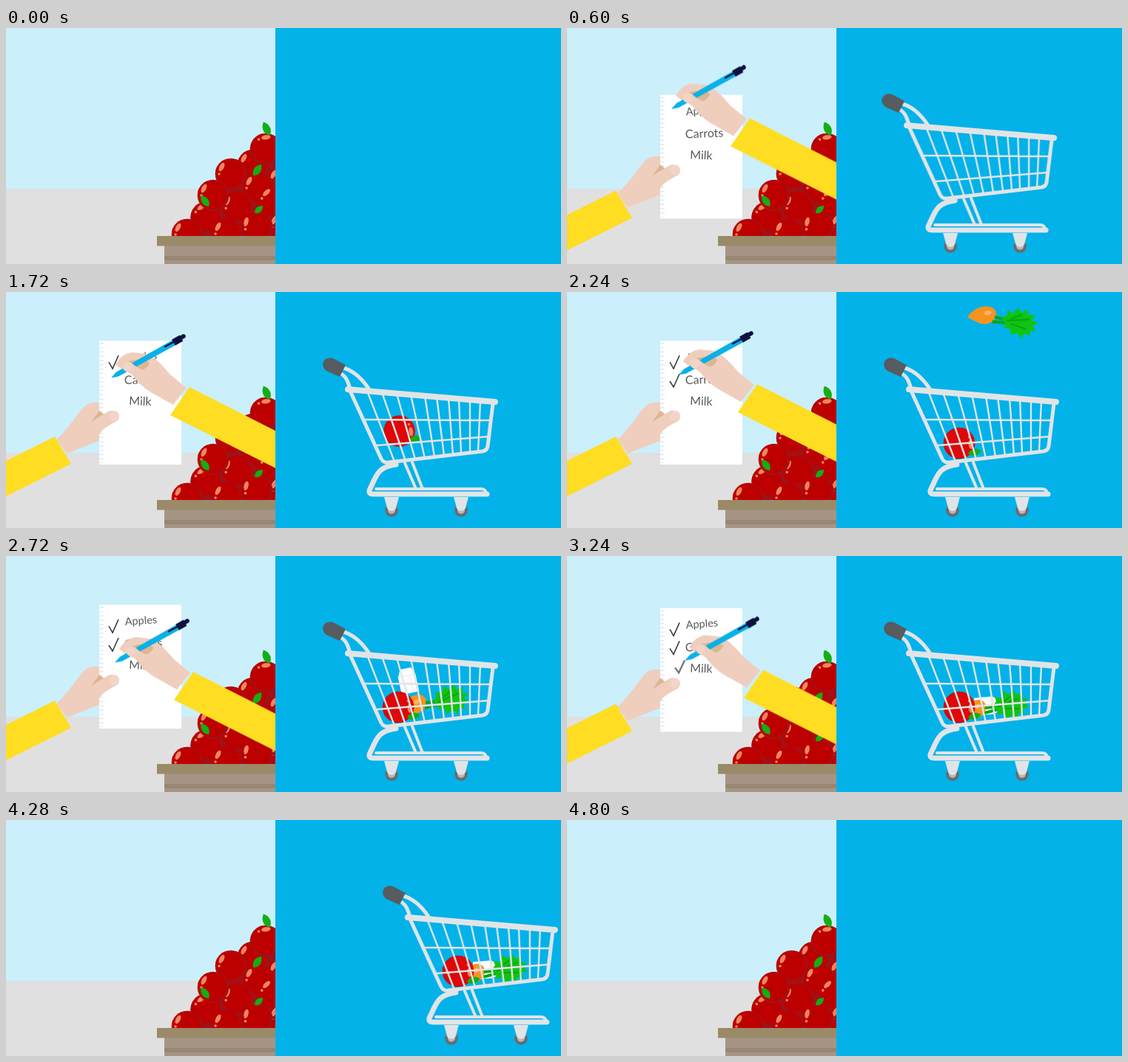
These frames come from a looping animation (750x320 px, 5.76 s). An HTML page:

```html
<!DOCTYPE html>
<html lang="en">
<head>
<meta charset="utf-8">
<title>Shopping list</title>
<style>
  html, body { margin: 0; width: 100%; height: 100%; overflow: hidden; }
  svg { display: block; }
  text { font-family: Lato, "Open Sans", sans-serif; font-size: 16px; fill: #595959; }

  .desk, .writer, .tick, .cart, .apple, .carrot, .milk {
    animation: 5760ms linear infinite;
  }
  .desk { animation-name: desk; }
  .writer { animation-name: writer; }
  .cart { animation-name: cart; }
  .apple { animation-name: apple; }
  .carrot { animation-name: carrot; }
  .milk { animation-name: milk; }
  .apple, .carrot { transform-box: fill-box; transform-origin: center; }

  .tick {
    animation-name: tick;
    fill: none; stroke: #333; stroke-width: 1.5;
    stroke-dasharray: 1 2; stroke-dashoffset: 1;
  }
  .tick.second { animation-delay: 1000ms; }
  .tick.third { animation-delay: 1880ms; stroke: #777; stroke-width: 2.4; }

  .skin { fill: #efcebd; }
  .shade { fill: #dcb592; }
  .sleeve { fill: #ffdd23; }
  .leaf { fill: #14ae14; }
  .metal { fill: none; stroke: #e1e4e7; stroke-linecap: round; stroke-linejoin: round; }

  /* paper and both hands */
  @keyframes desk {
    0%, 1.3% { transform: translateY(300px); animation-timing-function: cubic-bezier(.333, .667, .667, 1); }
    14.08% { transform: none; }
    54.86% { transform: none; animation-timing-function: cubic-bezier(.333, 0, .667, .333); }
    66.49%, 100% { transform: translateY(300px); }
  }
  /* pen hand: hover, then three ticks */
  @keyframes writer {
    0%, 14.24% { transform: translate(-1px, -31px); }
    15.28% { transform: translate(-4px, -22px); }
    16.67% { transform: translate(1px, -12px); }
    18.75%, 22.22% { transform: translate(9px, -31px); animation-timing-function: ease-in-out; }
    29.86% { transform: none; }
    31.94% { transform: translate(-12px, -3px); }
    32.64% { transform: translate(-4px, 4px); }
    34.03% { transform: translate(1px, 13px); }
    36.11%, 41.67% { transform: translate(9px, -4px); animation-timing-function: ease-in-out; }
    47.22% { transform: translate(5px, 28px); }
    47.92% { transform: translate(3px, 31px); }
    49.31% { transform: translate(8px, 38px); }
    51.39%, 100% { transform: translate(17px, 21px); }
  }
  @keyframes tick {
    0%, 15.28% { stroke-dashoffset: 1; }
    16.67% { stroke-dashoffset: .66; }
    18.75%, 67.35% { stroke-dashoffset: 0; }
    67.36%, 100% { stroke-dashoffset: 1; }
  }
  @keyframes cart {
    0%, 1.3% { transform: translateX(-310px); animation-timing-function: cubic-bezier(.333, 1, .667, 1); }
    12.85% { transform: none; }
    64.76% { transform: none; animation-timing-function: cubic-bezier(.36, 0, .68, .32); }
    83.33%, 100% { transform: translateX(330px); }
  }
  @keyframes apple {
    0%, 18.75% { transform: translate(15px, -235px) rotate(-60deg); animation-timing-function: cubic-bezier(.333, 0, .667, .333); }
    23.61% { transform: translate(8px, 0) rotate(-25deg); animation-timing-function: cubic-bezier(.333, .667, .667, 1); }
    27.78% { transform: translate(2px, -22px) rotate(-4deg); animation-timing-function: cubic-bezier(.333, 0, .667, .333); }
    31.94%, 100% { transform: none; }
  }
  @keyframes carrot {
    0%, 36.11% { transform: translate(12px, -240px) rotate(25deg); animation-timing-function: cubic-bezier(.333, 0, .667, .333); }
    40.97% { transform: translate(12px, 0) rotate(10deg); animation-timing-function: ease-out; }
    43.06% { transform: translate(9px, -8px) rotate(5deg); animation-timing-function: ease-in; }
    45.14%, 48.6% { transform: none; animation-timing-function: ease-in-out; }
    55.56%, 100% { transform: translate(-2px, 7px); }
  }
  @keyframes milk {
    0%, 43.06% { transform: translate(540px, -25px) rotate(-30deg); animation-timing-function: cubic-bezier(.333, 0, .667, .333); }
    46.53% { transform: translate(543px, 172px) rotate(-15deg); animation-timing-function: ease-out; }
    47.92% { transform: translate(543px, 168px) rotate(-11deg); animation-timing-function: ease-in; }
    50.69% { transform: translate(552px, 182px) rotate(35deg); }
    55.56%, 100% { transform: translate(568px, 203px) rotate(85deg); }
  }
</style>
</head>
<body>
<svg width="100%" height="100%" viewBox="0 0 750 320">
  <defs>
    <g id="fruit">
      <circle r="21.300" style="fill:var(--dark,#a01218)"/>
      <circle cx="-1.200" cy="-.8" r="19.900" style="fill:var(--lit,#bc0000)"/>
      <ellipse cx="-12.500" cy="-9.500" rx="3" ry="6.300" transform="rotate(28 -12.500 -9.500)" fill="#f0865f"/>
      <circle cx="-16" cy="0" r="1.800" fill="#f0865f"/>
    </g>
    <path id="leaf" class="leaf" d="M0 0C-8-6-7-14-2-20C5-15 7-6 0 0Z"/>
    <g id="wheel">
      <circle r="8.800" fill="#696b6e"/>
      <circle r="5" fill="#b4b6b8"/>
      <path d="M-10-18H10L7-7Q6 1 0 1Q-6 1-7-7Z" fill="#e1e4e7"/>
    </g>
  </defs>

  <svg width="364" height="320">
    <rect width="364" height="320" fill="#cbeffb"/>
    <rect y="218" width="364" height="102" fill="#e0e0e0"/>

    <!-- apple pile -->
    <path d="M262 282L305 210L345 172H364V282Z" fill="#a01218"/>
    <use href="#fruit" transform="translate(334 186)"/>
    <use href="#fruit" transform="translate(374 208)"/>
    <use href="#fruit" transform="translate(341 217)"/>
    <use href="#fruit" transform="translate(304 198)"/>
    <use href="#fruit" transform="translate(351 164) rotate(54)"/>
    <use href="#fruit" transform="translate(361 236) rotate(18)"/>
    <use href="#fruit" transform="translate(313 242) rotate(-8)"/>
    <use href="#fruit" transform="translate(270.500 257) rotate(28)"/>
    <use href="#fruit" transform="translate(280 227)"/>
    <use href="#fruit" transform="translate(375 270)"/>
    <use href="#fruit" transform="translate(339 269) rotate(-14)"/>
    <use href="#fruit" transform="translate(299 279)"/>
    <use href="#fruit" transform="translate(245 280)"/>
    <use href="#leaf" transform="translate(356 146) rotate(-18)"/>
    <use href="#leaf" transform="translate(334 200) rotate(42) scale(.93)"/>
    <use href="#leaf" transform="translate(274 242) rotate(-30) scale(.9)"/>
    <use href="#leaf" transform="translate(336 251) rotate(54) scale(.74)"/>

    <!-- crate -->
    <rect x="214" y="294" width="150" height="26" fill="#a69586"/>
    <rect x="214" y="309" width="150" height="6" fill="#988772"/>
    <rect x="204" y="282" width="160" height="13.500" fill="#9a8a68"/>

    <g class="desk">
      <path class="sleeve" d="M0 229L66 196L88 233L0 277Z"/>
      <path class="skin" d="M68 200C82 188 90 174 104 157C110 150 118 149 130 150V200L82 219Z"/>
      <rect x="126" y="66" width="111" height="168" fill="#fff"/>
      <path d="M129 69V232" stroke="#dce9ee" stroke-width="5" stroke-dasharray="1.5 4.3"/>
      <path class="shade" d="M126 161L114 178L128 180L134 167Z"/>
      <path class="skin" d="M112 178L138 162C148 157 158 168 150 175C138 181 129 186 124 196C119 204 112 205 106 208Z"/>
      <circle cx="146" cy="168" r="7" fill="#f2d5c8"/>

      <text transform="translate(161 94) rotate(-4)" style="font-size:14.5px">Apples</text>
      <text transform="translate(160 125) rotate(-2)">Carrots</text>
      <text transform="translate(166 153) rotate(2)">Milk</text>

      <path class="tick" pathLength="1" d="M139 95L144 104L152 86"/>
      <path class="tick second" pathLength="1" d="M139 121L144 129L152 111"/>
      <path class="tick third" pathLength="1" d="M146 147L151 154L159 137"/>

      <g class="writer">
        <path class="skin" d="M148 98C153 90 160 82 172 82L190 84C203 90 212 100 222 112L244 130L226 153L196 136C186 130 178 122 172 114C165 106 153 104 148 98Z"/>
        <path class="shade" d="M160 96C172 91 188 90 194 96C192 104 182 107 176 109Z"/>
        <path d="M142 116.500L149 108.500L228 63.500L232 70.500L152 114.500Z" fill="#08b1e8"/>
        <path d="M215 74L228 67" stroke="#0d1240" stroke-width="2.500" stroke-linecap="round"/>
        <path d="M226.500 68.500L237 62.500" stroke="#0d1240" stroke-width="9.500"/>
        <path d="M234 63.500L240 60" stroke="#0d1240" stroke-width="5.500" stroke-linecap="round"/>
        <path class="skin" d="M157 100C158 93 166 93 171 97C178 104 190 108 200 110L205 134C190 130 178 120 170 110C163 109 157 106 157 100Z"/>
        <ellipse cx="164" cy="101" rx="6.500" ry="6" fill="#f2d5c8"/>
        <path class="sleeve" d="M248 129L222 167L450 282V232Z"/>
      </g>
    </g>
  </svg>

  <svg x="364" width="386" height="320" viewBox="364 0 386 320">
    <rect x="364" width="386" height="320" fill="#02b2e9"/>
    <g class="cart">
      <g class="milk">
        <path d="M-12-7L-7-17H8L12-7V17H-12Z" fill="#fdfdfd"/>
        <path d="M-12-7H12M4-7V17" stroke="#e1ebf0" fill="none"/>
      </g>
      <g class="carrot">
        <path d="M532 212C538 190 560 182 567 193C571 203 563 214 550 214Z" fill="#f7931e"/>
        <ellipse cx="556" cy="197" rx="5" ry="3" transform="rotate(-30 556 197)" fill="#ffb568"/>
        <path d="M567 199L590 196M566 206L588 200" stroke="#0aa510" stroke-width="4"/>
        <path d="M577 197L582 190L580 184L589 186L592 176L599 181L605 174L609 181L618 178L616 186L625 186L619 192L626 198L618 200L621 207L612 206L611 214L603 209L596 214L592 207L584 208L583 202Z" fill="#0fc411"/>
        <path d="M584 198L612 186M590 200L613 200M588 194L601 183" stroke="#0aa510" stroke-width="2"/>
      </g>
      <g class="apple">
        <use href="#fruit" transform="translate(530 205) rotate(148)" style="--lit:#df0707;--dark:#cd0a0a"/>
        <use href="#leaf" transform="translate(542 219) rotate(83) scale(.9)"/>
      </g>

      <!-- basket -->
      <g class="metal">
        <path stroke-width="2.400" d="M488 134L525 230M508 136L540 229M528 138L553 227M547 139L566 226M566 141L579 224M582 142L592 222M598 144L604 221M612 145L615 219M627 146L627 218M641 147L638 216M486 173L655 174M501 208L652 196"/>
        <path stroke-width="5" d="M465 134L507 226Q510 232 517 231L644 216Q650 215 651 209L658 151"/>
        <path stroke-width="5" d="M453 102C471 106 482 119 490 131M449 109C460 113 462 122 465 131"/>
        <path stroke-width="8" d="M462 132L661 149"/>
        <path stroke-width="4" d="M539 232L554 267M549 231L563 267M500 267H642Q648 267 649 273"/>
        <path stroke-width="7" d="M527 234C505 237 502 246 497 256L491 269Q490 274 496 274H650"/>
      </g>
      <path d="M442 90L459 99L451 115L433 107C423 100 430 86 442 90Z" fill="#575c60"/>
      <use href="#wheel" x="521" y="296"/>
      <use href="#wheel" x="615" y="296"/>
    </g>
  </svg>
</svg>
</body>
</html>
```
